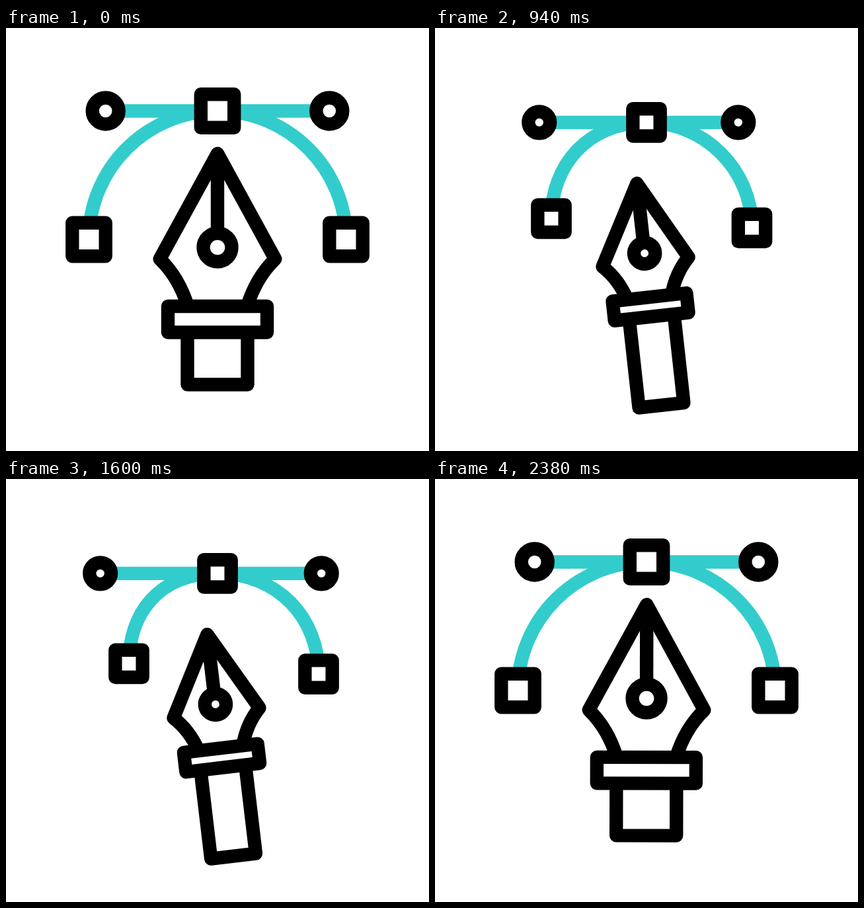
Write an HTML page with a canvas that moves like this. It is 640 by 640 pixels and loops after 2.4 s.

```html
<!DOCTYPE html>
<html lang="en">
<head>
<meta charset="utf-8">
<title>Pen tool</title>
<style>
  html, body { margin: 0; height: 100%; overflow: hidden; background: #fff; }
  canvas { display: block; width: 100vw; height: 100vh; }
</style>
</head>
<body>
<canvas width="640" height="640"></canvas>
<script>
const ctx = document.querySelector('canvas').getContext('2d');
const LOOP = 2400, STEP = 20, MID = 320;
const INK = '#000', TEAL = '#33cccc';

// Keys are [time, value] pairs, eased in and out between neighbours.
const SHRINK = [[200, 0], [800, 1], [2000, 1], [2360, 0]];
const LEFT = [[800, 0], [1100, 1], [1400, 0], [1700, 1], [2000, 0]];
const RIGHT = [[1100, 0], [1400, 1], [1700, 0], [2000, 1], [2360, 0]];
const TILT = [[800, 0], [1100, -14], [1400, 14], [1700, -14], [2000, 14], [2400, 0]];

const mix = (a, b, p) => a + (b - a) * p;

function track(keys, t) {
  const i = keys.findIndex(k => k[0] > t);
  if (i === 0) return keys[0][1];
  if (i < 0) return keys[keys.length - 1][1];
  const [t0, a] = keys[i - 1], [t1, b] = keys[i];
  const p = (t - t0) / (t1 - t0);
  return mix(a, b, p * p * (3 - 2 * p));
}

function stroke(color, build, fill) {
  ctx.beginPath();
  build();
  if (fill) {
    ctx.fillStyle = '#fff';
    ctx.fill();
  }
  ctx.strokeStyle = color;
  ctx.stroke();
}

const ring = (x, y, r) => stroke(INK, () => ctx.arc(x, y, r, 0, 7), true);
const box = (x, y, r) => stroke(INK, () => ctx.rect(x - r, y - r, 2 * r, 2 * r), true);

function line(color, ...points) {
  stroke(color, () => points.forEach(p => ctx.lineTo(...p)));
}

// One half of the curve: side is -1 or 1, pull moves its handle and anchor.
function half(side, size, pull, reach, dx, dy, bend) {
  const top = 222 - 96.5 * size;
  const handle = MID + side * (169.3 * size + reach * pull);
  const w = 194.5 * size - dx * pull;
  const y = 222 + 98 * size - dy * pull;
  const h = 107.4 * size + bend * pull;
  const x = MID + side * w;
  line(TEAL, [MID, top], [handle, top]);
  stroke(TEAL, () => {
    ctx.moveTo(MID, top);
    ctx.bezierCurveTo(MID + side * h, top, x, mix(y, top, 0.552), x, y);
  });
  ring(handle, top, 20 * size);
  box(x, y, 25.2 * size);
}

function curve(t, shrink) {
  const size = mix(1, 0.82, shrink);
  half(-1, size, track(LEFT, t), 52, 34.4, 31, 2);
  half(1, size, track(RIGHT, t), 70.9, 25.1, 28.2, 16);
  box(MID, 222 - 96.5 * size, 25.2 * size);
}

function pen(t, shrink) {
  const k = mix(1, 0.75, shrink);
  const y = v => (v - 367) * k;
  const end = mix(539.5, 572, shrink) - 367;

  ctx.save();
  ctx.translate(MID, 367);
  ctx.rotate(track(TILT, t) * Math.PI / 180);
  stroke(INK, () => {
    ctx.moveTo(-45 * k, y(421));
    ctx.quadraticCurveTo(-58 * k, y(378), -87.3 * k, y(349.5));
    ctx.lineTo(0, y(190));
    ctx.lineTo(87.3 * k, y(349.5));
    ctx.quadraticCurveTo(58 * k, y(378), 45 * k, y(421));
  });
  line(INK, [0, y(190)], [0, y(332)]);
  ring(0, y(332), 21.5 * k);
  line(INK, [-45.5 * k, y(460.5)], [-45.5 * k, end], [45.5 * k, end], [45.5 * k, y(460.5)]);
  stroke(INK, () => ctx.rect(-75 * k, y(421), 150 * k, 39.5 * k), true);
  ctx.restore();
}

function draw(now) {
  const t = Math.floor(now % LOOP / STEP) * STEP;
  const shrink = track(SHRINK, t);
  ctx.clearRect(0, 0, 640, 640);
  ctx.lineWidth = 20.4;
  ctx.lineJoin = 'round';
  curve(t, shrink);
  pen(t, shrink);
}

let start;
function tick(now) {
  start ??= now;
  draw(now - start);
  requestAnimationFrame(tick);
}
requestAnimationFrame(tick);
</script>
</body>
</html>
```
